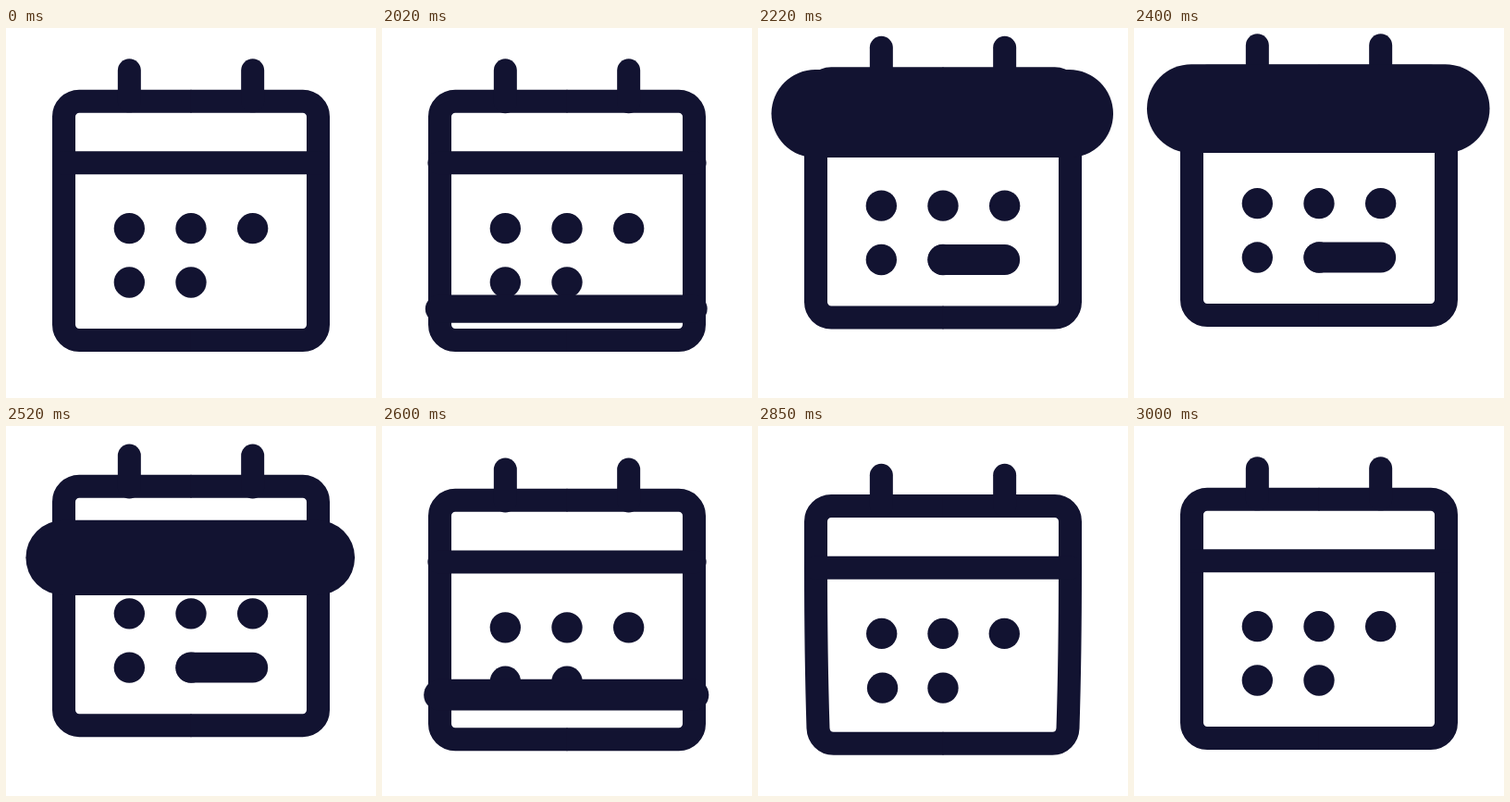
Animation, 400 px wide and 400 px high, one loop 3.02 s. Source, as an HTML page with a canvas:

```html
<!DOCTYPE html>
<html lang="en">
<head>
<meta charset="utf-8">
<title>Calendar</title>
<style>
html, body { margin: 0; width: 100%; height: 100%; overflow: hidden; background: #fff; }
canvas { display: block; width: 400px; height: 400px; }
</style>
</head>
<body>
<canvas id="stage"></canvas>
<script>
const LOOP = 3020, START = 2020, END = 3000;
const INK = '#121331';
const U = 400 / 48;
const LEFT = 7.5 * U, TOP = 9.5 * U, HINGE = 17.5 * U, BOTTOM = 40.5 * U;
const R = 2 * U, LINE = 3 * U;
const COLS = [16 * U, 24 * U, 32 * U], ROWS = [26 * U, 33 * U];

// [time, value] keys, joined by smooth curves
const LIFT = [[2010, 0], [2020, 0], [2045, -2.2], [2120, -13], [2200, -23], [2320, -29],
  [2400, -27], [2520, -14], [2600, 1], [2660, 12.5], [2715, 17.2], [2800, 12],
  [2900, 3.5], [3000, 0]];
const FLIP = [[1995, 0], [2020, 0.145], [2045, 0.33], [2120, 0.821], [2200, 0.97],
  [2310, 1.025], [2400, 1], [2470, 0.945], [2520, 0.815], [2600, 0.2215], [2635, 0]];
const BEND = [[2635, 0], [2700, 1], [2730, 1.08], [2850, 0.5], [3000, 0]];

const canvas = document.getElementById('stage');
const ctx = canvas.getContext('2d');
const dpr = window.devicePixelRatio || 1;
canvas.width = canvas.height = 400 * dpr;

// Monotone cubic interpolation
function curve(keys, t) {
  const n = keys.length - 1;
  if (t <= keys[0][0]) return keys[0][1];
  if (t >= keys[n][0]) return keys[n][1];
  const rate = i => (keys[i + 1][1] - keys[i][1]) / (keys[i + 1][0] - keys[i][0]);
  const slope = i => {
    if (i === 0) return rate(0);
    if (i === n) return rate(n - 1);
    const a = rate(i - 1), b = rate(i);
    return a * b <= 0 ? 0 : 2 * a * b / (a + b);
  };
  let i = 0;
  while (t > keys[i + 1][0]) i++;
  const h = keys[i + 1][0] - keys[i][0];
  const s = (t - keys[i][0]) / h, q = 1 - s;
  return keys[i][1] * (1 + 2 * s) * q * q + slope(i) * h * s * q * q
    + keys[i + 1][1] * s * s * (3 - 2 * s) - slope(i + 1) * h * s * s * q;
}

function line(x1, y1, x2, y2, width, cap = 'round') {
  ctx.lineWidth = width;
  ctx.lineCap = cap;
  ctx.beginPath();
  ctx.moveTo(x1, y1);
  ctx.lineTo(x2, y2);
  ctx.stroke();
}

function dot(col, row, bend) {
  const depth = (ROWS[row] - HINGE) / (BOTTOM - HINGE);
  const inset = 5.5 * bend * depth * depth * Math.sign(200 - COLS[col]);
  ctx.beginPath();
  ctx.arc(COLS[col] + inset, ROWS[row] + 0.8 * (row + 1) * bend, R, 0, Math.PI * 2);
  ctx.fill();
}

function dots(bend) {
  COLS.forEach((_, col) => dot(col, 0, bend));
  dot(0, 1, bend);
  dot(1, 1, bend);
}

function halfBody(bend) {
  const x = LEFT + 5 * bend, y = BOTTOM - 3.2 * bend, k = R * 0.448;
  ctx.lineWidth = LINE;
  ctx.lineCap = 'butt';
  ctx.beginPath();
  ctx.moveTo(200.5, TOP);
  ctx.arcTo(LEFT, TOP, LEFT, TOP + R, R);
  ctx.lineTo(LEFT, HINGE);
  ctx.quadraticCurveTo(LEFT, HINGE + 95, x, y - R);
  ctx.bezierCurveTo(x + 0.8 * bend, y - k, x + k, y, x + R, y);
  ctx.lineTo(200.5, y);
  ctx.stroke();
}

function clipRows(from, to, paint) {
  ctx.save();
  ctx.beginPath();
  ctx.rect(0, from, 400, to - from);
  ctx.clip();
  paint();
  ctx.restore();
}

function draw(t) {
  const moving = t >= START && t < END;
  const lift = moving ? curve(LIFT, t) : 0;
  const flip = moving ? curve(FLIP, t) : 0;
  const bend = moving ? curve(BEND, t) : 0;

  ctx.setTransform(dpr, 0, 0, dpr, 0, 0);
  ctx.fillStyle = '#fff';
  ctx.fillRect(0, 0, 400, 400);
  ctx.fillStyle = ctx.strokeStyle = INK;
  ctx.translate(0, lift);

  halfBody(bend);
  ctx.save();
  ctx.translate(400, 0);
  ctx.scale(-1, 1);
  halfBody(bend);
  ctx.restore();

  const slack = flip > 0 ? 0.6 : 0;
  for (const x of [COLS[0], COLS[2]]) line(x, 5.5 * U, x, TOP - 0.3 + slack * 1.5, LINE);
  line(LEFT - slack, HINGE, 400 - LEFT + slack, HINGE, LINE);

  if (flip <= 0) {
    dots(bend);
    return;
  }

  // The turning page keeps its dots above its edge and reveals the next page below
  const edge = BOTTOM - 223.5 * flip;
  clipRows(HINGE, Math.max(HINGE, edge), () => dots(0));
  clipRows(edge, 400, () => {
    dots(0);
    line(COLS[1], ROWS[1], COLS[2], ROWS[1], 2 * R - 0.4);
  });
  const width = LINE + 71 * (flip - 0.7 * flip * (1 - flip) ** 2);
  line(LEFT - 0.5, edge, 399 - LEFT, edge, width);
}

const begin = performance.now();
function tick() {
  draw((performance.now() - begin) % LOOP);
  requestAnimationFrame(tick);
}
tick();
</script>
</body>
</html>
```
